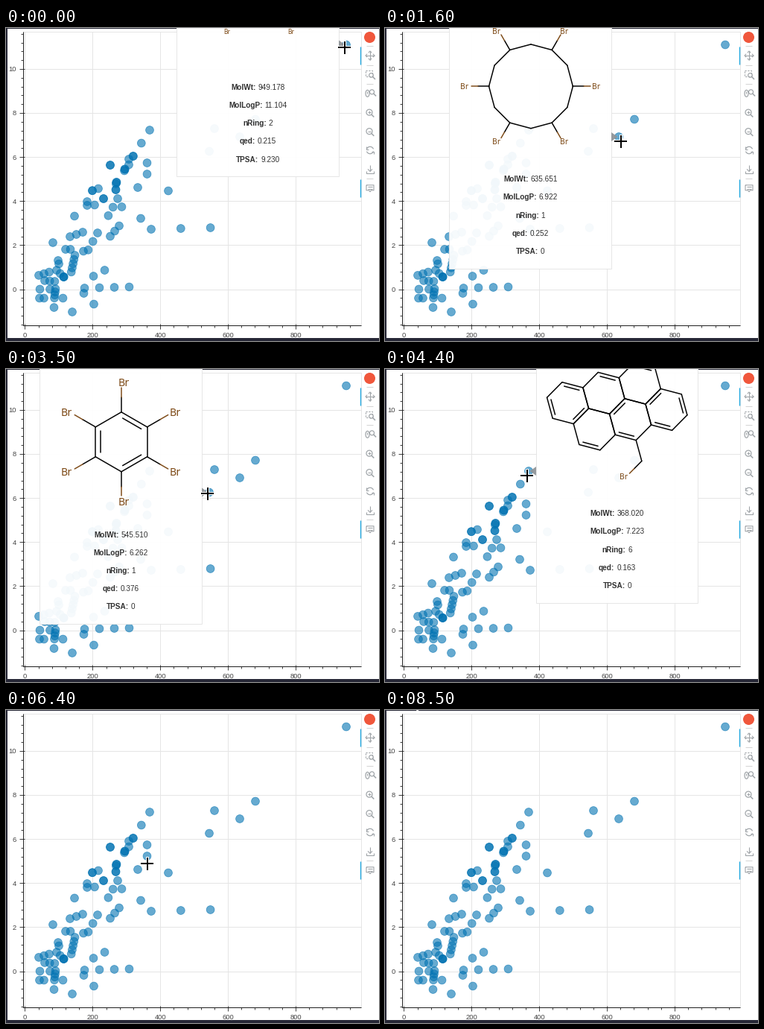
Recreate the animation shown at these times as a matplotlib script. Size 501x420 px, loop 8.7 s.

```python
import numpy as np
import matplotlib.pyplot as plt
from matplotlib.animation import FuncAnimation
from matplotlib.offsetbox import AnnotationBbox, HPacker, TextArea
from matplotlib.patches import Arc, Circle, Polygon, Rectangle

W, H, DPI = 501, 420, 100
PT = 72 / DPI
SANS, MOL_FONT = "Liberation Sans", "DejaVu Sans"
DARK, GRID, ICON, AXIS = "#262736", "#e5e5e5", "#9fa4a8", "#222222"
BLACK, BROWN, BLUE, RED = "#000000", "#7f4c19", "#0000ff", "#ff0000"
TIP_W, TIP_HALF, TIP_GAP, HIT = 217.5, 176.7, 10, 7.3
LEFT, RIGHT, TOP, BASE = 23.5, 477, 4.5, 398.5

fig = plt.figure(figsize=(W / DPI, H / DPI), dpi=DPI, facecolor="white")
ax = fig.add_axes([0, 0, 1, 1])
ax.set_xlim(0, W)
ax.set_ylim(H, 0)
ax.axis("off")


def line(xs, ys, color, width=1.0, z=1, cap="butt"):
    return ax.plot(xs, ys, color=color, lw=width * PT, zorder=z,
                   solid_capstyle=cap)[0]


def stroke(points, color, width=1.0, z=1, cap="butt"):
    points = np.asarray(points, dtype=complex)
    return line(points.real, points.imag, color, width, z, cap)


def text(x, y, s, px, color, font=SANS, ha="center", z=2):
    return ax.text(x, y + 0.355 * px, s, fontsize=px * PT, color=color,
                   family=font, ha=ha, va="baseline", zorder=z)


def unit(deg):
    return np.exp(1j * np.radians(deg))


# ---- plot frame, axes and grid ----
def sx(v):
    return 25.5 + 0.4544 * v


def sy(v):
    return 350.5 - 29.55 * v


def draw_axes():
    for v in range(0, 961, 40):
        major = v % 200 == 0
        if major:
            line([sx(v)] * 2, [TOP, BASE], GRID)
            text(sx(v), 412, str(v), 9.35, "#444444")
        line([sx(v)] * 2, [BASE - 2 * major, BASE + (5 if major else 3.5)], AXIS, 0.85)
    for k in range(-4, 30):
        v = 0.4 * k
        major = k >= 0 and k % 5 == 0
        if major:
            line([LEFT, RIGHT], [sy(v)] * 2, GRID)
            text(14, sy(v), f"{v:.0f}", 9.35, "#444444", ha="right")
        line([LEFT - (5 if major else 3.5), LEFT + 2 * major], [sy(v)] * 2, AXIS, 0.85)
    ax.add_patch(Rectangle((LEFT, TOP), RIGHT - LEFT, BASE - TOP, fill=False,
                           ec=GRID, lw=PT, zorder=1))
    line([LEFT, LEFT, RIGHT], [TOP, BASE, BASE], AXIS, z=2)
    for x, y, w, h in ((0, 0, 2, H), (0, 416, W, 4), (0, 0, W, 0.8)):
        ax.add_patch(Rectangle((x, y), w, h, fc=DARK, lw=0, zorder=3))


# ---- scatter: homologous series step by a fixed mass and logP ----
CH2, RING, BENZO = -6.3 + 11.4j, -11.2 + 17.5j, -24 + 34.2j
SERIES = [  # first point, step, count
    (193 + 137j, RING, 5), (171 + 172j, RING, 3), (159 + 191.5j, RING, 2),
    (140 + 184j, BENZO, 3), (140 + 184j, BENZO, 2), (150 + 229j, CH2, 3),
    (123 + 275j, CH2, 3), (109 + 233j, 5j, 2), (165 + 176j, 7.5j, 2),
    (195 + 270j, 39.8 - 1j, 3), (105.5 + 349j, 20 - 0.5j, 4),
    (152 + 265.5j, -6 + 7j, 3), (103 + 274j, -8.5 + 3j, 3),
    (92.5 + 305j, -1.2 + 5.6j, 5), (68 + 325j, 4.8 + 4.5j, 3),
    (58 + 327.5j, -7 + 2.2j, 3), (52 + 339j, 6.7 + 0.5j, 3),
    (45.5 + 350.5j, 13.5, 2), (66.5 + 350j, -0.5 + 4.1j, 4),
    (45 + 362.5j, 6, 2), (80 + 297j, 6.5, 2), (70 + 312j, 1 + 4.5j, 2),
]
TWINS = [131 + 229j, 147.5 + 217j, 77.5 + 334j]
SINGLES = [218 + 218.5j, 124 + 215.5j, 119 + 237.5j, 155.5 + 240j, 63 + 288j,
           104 + 299.5j, 132.5 + 325j, 117.5 + 333j, 104.5 + 356j,
           76.5 + 362.5j, 118 + 370.5j, 64.5 + 375j, 89 + 381j]


def draw_points(hovered):
    run = [p + k * step for p, step, n in SERIES for k in range(n)]
    rest = [p for p in hovered if min(abs(p - q) for q in run) > 2]
    for p in run + rest + TWINS * 2 + SINGLES:
        ax.add_patch(Circle((p.real, p.imag), 5.4, fc="#0072b2", ec="#0072b2",
                            lw=0.8 * PT, alpha=0.6, zorder=2.5))


# ---- toolbar ----
def icon(*points):
    stroke(points, ICON, 1.1, 4)


def ellipse(c, w, h, start=0, end=360):
    ax.add_patch(Arc((c.real, c.imag), w, h, theta1=start, theta2=end,
                     ec=ICON, lw=1.2 * PT, zorder=4))


def lens(c, r):
    ellipse(c, 2 * r, 2 * r)
    corner = c + 0.7 * r * (1 + 1j)
    stroke([corner, corner + 3.5 + 3.5j], ICON, 1.5, 4)


def draw_toolbar():
    ax.add_patch(Circle((488.5, 12.5), 7.5, fc="#f0573c", lw=0, zorder=4))
    pan, box, wheel, zoom_in, zoom_out, reset, save, hover = (
        489 + 1j * (37 + 25.4 * k) for k in range(8))
    for c in (pan, box + 25.4j / 2 - 25.4j / 2, wheel, hover):
        y = c.imag - 12.7
        if c != box:
            line([484.5, 493], [y, y], "#d4d4d4", 1, 4)
    for c in (pan, hover):
        line([476.5, 476.5], [c.imag - 12, c.imag + 12], "#26aae1", 1.4, 4)
    for d in (1, 1j, -1, -1j):
        tip = pan + 6 * d
        icon(pan, tip)
        icon(tip - (2.2 + 2.2j) * d, tip, tip - (2.2 - 2.2j) * d)
    corner = box - 5.5 - 5.5j
    ax.add_patch(Rectangle((corner.real, corner.imag), 8.5, 8.5, fill=False,
                           ec=ICON, lw=1.1 * PT, ls=(0, (2, 1.5)), zorder=4))
    lens(box + 1.5 + 1j, 2.8)
    ellipse(wheel - 3.5, 5, 9)
    icon(wheel - 3.5 - 3j, wheel - 3.5)
    lens(wheel + 2.5 - 2j, 3)
    for c in (zoom_in, zoom_out):
        lens(c - 1, 4)
        icon(c - 3, c + 1)
    icon(zoom_in - 1 - 2j, zoom_in - 1 + 2j)
    for s in (1, -1):
        ellipse(reset, 9.5, 9.5, 110 - 90 * s, 250 - 90 * s)
        icon(*(reset + s * np.array([5 + 5j, 5 + 1.5j, 2 + 1.5j])))
    icon(save - 5j, save + 3j)
    icon(save - 3, save + 3j, save + 3)
    icon(save - 5 + 3j, save - 5 + 6j, save + 5 + 6j, save + 5 + 3j)
    icon(*(hover + np.array([-5 - 4j, 5 - 4j, 5 + 3j, 1.5 + 3j, 5j,
                             -1.5 + 3j, -5 + 3j, -5 - 4j])))
    for y in (-1.5j, 0.8j):
        icon(hover - 3 + y, hover + 3 + y)


# ---- molecules: complex coordinates in bond lengths ----
class Mol:
    def __init__(self, centre, bond, px):
        self.centre, self.b, self.px = centre, bond, px
        self.parts = []

    def stroke(self, p, q, color=BLACK):
        ends = self.centre + self.b * np.array([p, q])
        self.parts.append(stroke(ends, color, 1.5, 6, "round"))

    def bond(self, p, q, color=None):
        """Bond from carbon p to q; a coloured half leads to a labelled atom."""
        if color is None:
            return self.stroke(p, q)
        mid, gap = (p + q) / 2, 0.56 * self.px / self.b
        self.stroke(p, mid)
        self.stroke(mid, q - gap * (q - p) / abs(q - p), color)

    def atom(self, p, name, color, shift=0.0):
        p = self.centre + self.b * p
        self.parts.append(text(p.real + shift * self.px, p.imag, name, self.px,
                               color, MOL_FONT, z=6))

    def bromo(self, p, deg):
        q = p + unit(deg)
        self.bond(p, q, BROWN)
        self.atom(q, "Br", BROWN, 0.2 if (q - p).real > -0.05 else -0.35)

    def ring(self, c, phase, doubles=(0, 2, 4)):
        v = c + unit(phase + 60 * np.arange(7))
        for k in range(6):
            self.stroke(v[k], v[k + 1])
        for k in doubles:
            a, b = c + 0.82 * (v[k:k + 2] - c)
            trim = 0.06 * (b - a)
            self.stroke(a + trim, b - trim)


def two_bromines(m):
    for x in (-43, 43):
        m.atom((x + 1 + 50j) / m.b, "Br", BROWN)


def macrocycle(m):
    r = 0.5 / np.sin(np.radians(15))
    for a in range(0, 360, 30):
        m.bond(r * unit(a), r * unit(a + 30))
        if a % 60 == 0:
            m.bromo(r * unit(a), a)


def diether(m):
    u, v = unit(30), unit(-30)
    for s in (-1, 1):
        c, out = s * (5 * u + 2 * v) / 2, s * u
        m.ring(c, 30)
        oxygen = c - 2 * out
        m.bond(c - out, oxygen, RED)
        m.bond(oxygen - s * v, oxygen, RED)
        m.atom(oxygen, "O", RED)
        for d in (0, 120, -120):
            m.bromo(c + out * unit(d), 120 - 90 * s + d)
    m.bond(-u / 2, u / 2)


def diaryl(link, color, left, right):
    def draw(m):
        o = -0.5j
        for deg, subs in ((150, left), (30, right)):
            c = o + 2 * unit(deg)
            m.ring(c, 30)
            m.bond(o + unit(deg), o, color)
            for a in subs:
                m.bromo(c + unit(a), a)
        m.atom(o, link, color)
    return draw


def hexabromo(m):
    m.ring(0, 30)
    for a in range(30, 390, 60):
        m.bromo(unit(a), a)


# Fused hexagons: ring centres lie on a lattice around ring RB.
PHASE = 14.7


def lattice(k):
    return np.sqrt(3) * unit(PHASE + 30 + 60 * k)


RB = -1.08 + 0.4j
RC, RE = RB + lattice(5), RB + lattice(4)
RD, RF = RC + lattice(5), RC + lattice(4)


def fused(rings, arm_ring, arm_deg, turn):
    def draw(m):
        for c, doubles in rings:
            m.ring(c, PHASE, doubles)
        p = arm_ring + unit(PHASE + arm_deg)
        q = p + unit(PHASE + arm_deg)
        m.bond(p, q)
        m.bromo(q, PHASE + arm_deg + turn)
    return draw


six_rings = fused([(RB + lattice(3), (0, 2, 4)), (RB, (1,)), (RC, (1, 3)),
                   (RD, (1, 3, 5)), (RE, (4,)), (RF, (4,))], RC, 60, 60)
five_rings = fused([(RB + lattice(1), (0, 2, 4)), (RB, (3,)), (RC, (1, 3, 5)),
                    (RE, (3,)), (RF, (3, 5))], RF, 240, -60)


def aziridine(turn):
    def draw(m):
        c, a = 1.79 + 0.39j, 2.5
        m.ring(c, a, ())
        m.ring(c + np.sqrt(3) * unit(a - 90), a, (1, 3, 5))
        m.ring(c + np.sqrt(3) * unit(a + 30), a)
        left, right = c + unit(a + 180), c + unit(a + 120)
        n = left + unit(a + 120)
        ch2 = n + unit(152.6)
        for p in (left, right, ch2):
            m.bond(p, n, BLUE)
        m.atom(n, "N", BLUE)
        axis = unit(212.5)
        m.bond(ch2, ch2 + axis)
        m.ring(ch2 + 2 * axis, 32.5)
        m.bromo(ch2 + 2 * axis + axis * unit(turn), 212.5 + turn)
    return draw


def ethane(m):
    m.bond(-0.5, 0.5)
    for a in (60, -60):
        m.bromo(0.5, a)
        m.bromo(-0.5, 180 + a)


# ---- tooltips: point, values, drawing, bond length, label size ----
FIELDS = ("MolWt", "MolLogP", "nRing", "qed", "TPSA")
TIPS = [
    (457 + 22.5j, "949.178 11.104 2 0.215 9.230", two_bromines, 20, 8.2),
    (335 + 122.5j, "681.561 7.718 2 0.226 18.460", diether, 17.5, 8),
    (314 + 146j, "635.651 6.922 1 0.252 0", macrocycle, 29.2, 10),
    (280 + 135j, "559.626 7.291 2 0.302 9.230",
     diaryl("O", RED, (270, 150), (270, 30, 90)), 22, 8.5),
    (273 + 165.5j, "545.510 6.262 1 0.376 0", hexabromo, 40, 13.5),
    (193 + 137j, "368.020 7.223 6 0.163 0", six_rings, 28.95, 10),
    (182 + 154.5j, "344.020 6.632 5 0.212 0", five_rings, 26, 9.5),
    (189.5 + 181j, "361.047 5.728 5 0.527 3.010", aziridine(0), 21.9, 8),
    (189.5 + 196j, "361.047 5.241 5 0.462 3.010", aziridine(60), 21.9, 8),
    (181 + 255.5j, "341.689 3.218 0 0.640 0", ethane, 73.5, 24.6),
    (177 + 214j, "332.953 4.622 2 0.688 12.030",
     diaryl("N", BLUE, (150,), (30,)), 24, 9),
]


def make_tip(point, values, draw, bond, px):
    x, y = point.real, point.imag
    side = 1 if x < W / 2 else -1
    edge = x + side * TIP_GAP
    mid, top = edge + side * TIP_W / 2, y - TIP_HALF
    parts = [
        ax.add_patch(Rectangle((mid - TIP_W / 2, top), TIP_W, 2 * TIP_HALF,
                               fc="white", ec=GRID, lw=PT, alpha=0.95, zorder=5)),
        ax.add_patch(Polygon([(edge, y - 6), (edge, y + 6), (edge - side * 8.5, y)],
                             fc="#909599", lw=0, alpha=0.95, zorder=5)),
    ]
    mol = Mol(complex(mid + 0.7, top + 109), bond, px)
    draw(mol)
    style = dict(family=SANS, fontsize=10 * PT, color="#303030")
    for k, (name, value) in enumerate(zip(FIELDS, values.split())):
        row = HPacker(children=[TextArea(name + ":", textprops=dict(style, weight="bold")),
                                TextArea(value, textprops=style)],
                      align="baseline", pad=0, sep=2.78 * PT)
        box = AnnotationBbox(row, (mid, y + 57.2 + 24.2 * k), frameon=False,
                             pad=0, box_alignment=(0.5, 0.5))
        box.set_zorder(6)
        parts.append(ax.add_artist(box))
    return point, parts + mol.parts


# ---- cursor: eased moves with rests between them ----
START = 455 + 26j
MOVES = [  # first and last step, target
    (4, 10, 337 + 125j), (11, 16, 317 + 152j), (16, 19, 315 + 149j),
    (21, 24, 296 + 135j), (25, 26, 282 + 137j), (28, 31, 275 + 168j),
    (34, 42, 191 + 143j), (44, 47, 179 + 157j), (48, 52, 193 + 179j),
    (55, 56, 191 + 188j), (56, 58, 191 + 197j), (62, 70, 182 + 253j),
    (72, 75, 180 + 215j), (78, 83, 4 + 70j), (83, 85, 38 - 14j),
]
ARROW = np.array([(0, 0), (0, 13), (3, 10.3), (5, 15), (7, 14), (5, 9.5), (9, 9.5)])


def cursor_at(i):
    pos = START
    for first, last, target in MOVES:
        u = np.clip((i - first) / (last - first), 0, 1)
        pos += (target - pos) * u * u * (3 - 2 * u)
    return complex(np.round(pos))


draw_axes()
draw_points([t[0] for t in TIPS])
draw_toolbar()
tips = [make_tip(*t) for t in TIPS]
cross = [(line([], [], color, width, 9), r * d)
         for color, width, r in (("white", 4, 9.5), (BLACK, 2, 8.5))
         for d in (1, 1j)]
arrow = ax.add_patch(Polygon(ARROW, fc=BLACK, ec="white", lw=PT, zorder=9))


def update(i):
    pos = cursor_at(i)
    for point, parts in tips:
        for part in parts:
            part.set_visible(abs(pos - point) < HIT)
    inside = pos.real > LEFT and pos.imag > TOP
    for bar, arm in cross:
        ends = pos + np.array([-arm, arm])
        bar.set_data(ends.real, ends.imag)
        bar.set_visible(inside)
    arrow.set_visible(not inside)
    arrow.set_xy(ARROW + (pos.real, pos.imag))


anim = FuncAnimation(fig, update, frames=87, interval=100, repeat=True, blit=False)
plt.show()
```
